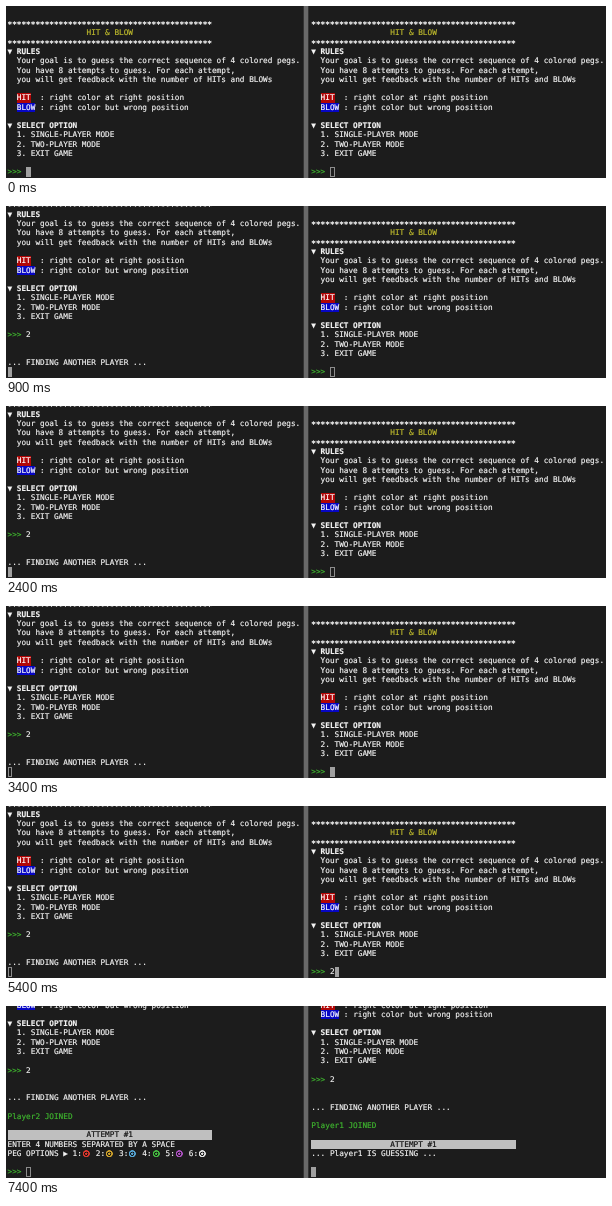
Animation, 600 px wide and 172 px high, one loop 7900 ms. Source, as an HTML page:

```html
<!DOCTYPE html>
<html lang="en">
<head>
<meta charset="utf-8">
<title>Hit &amp; Blow</title>
<style>
  :root { --cell: 4.65px; --row: 9.27px; }
  html, body { margin: 0; width: 100%; height: 100%; overflow: hidden; background: #1c1c1c; }
  #stage {
    position: relative; width: 600px; height: 172px; overflow: hidden;
    background: #1c1c1c; color: #f4f4f4;
    font: 7.724px/var(--row) "DejaVu Sans Mono", monospace;
    text-rendering: geometricPrecision;
    font-variant-ligatures: none;
    -webkit-text-stroke: .18px;
  }
  .pane { position: absolute; top: 0; height: 172px; overflow: hidden; }
  #left { left: 0; width: 297px; }
  #right { left: 302px; width: 298px; }
  .log { position: absolute; bottom: 1.3px; white-space: pre; }
  #left .log { left: 1.5px; }
  #right .log { left: 3.3px; }
  .line { height: var(--row); }
  .line span, .line i { display: inline-block; height: var(--row); vertical-align: top; }
  .line .stars { position: relative; top: 1.2px; font-weight: bold; }
  .title { color: #bdb92c; }
  .head { font-weight: bold; }
  .hit { background: #b00606; color: #fff; }
  .blow { background: #0606c4; color: #fff; }
  .ok { color: #3fb62f; }
  .banner { width: calc(44 * var(--cell)); background: #bfbfbf; color: #111; }
  .peg {
    width: calc(2 * var(--cell));
    background: radial-gradient(circle at 4.3px 4.7px,
      var(--c) 0 1px, #0007 1.4px 1.9px, var(--c) 2.3px 3.2px, transparent 3.8px);
  }
  .cursor { width: var(--cell); box-sizing: border-box; border: 1px solid #8c8c8c; }
  .active .cursor { background: #a0a0a0; border-color: #a0a0a0; }
  #divider {
    position: absolute; left: 297px; top: 0; width: 6px; height: 172px;
    background: linear-gradient(90deg, #333 0 1px, #696969 1px 5px, #333 5px);
  }
</style>
</head>
<body>
<div id="stage">
  <div class="pane" id="left"><div class="log"></div></div>
  <div class="pane" id="right"><div class="log"></div></div>
  <div id="divider"></div>
</div>
<script>
const LOOP = 7900;
const span = (cls, text) => `<span class="${cls}">${text}</span>`;
const prompt = typed => span("ok", "&gt;&gt;&gt;") + " " + typed;
const center = " ".repeat(17);
const stars = span("stars", "*".repeat(44));
const pegColors = ["#e2392f", "#d3a52c", "#58a8d8", "#46bd42", "#b053c4", "#e4e4e4"];
const pegs = pegColors.map((c, i) => `${i + 1}:<i class="peg" style="--c:${c}"></i>`).join(" ");

const menu = [
  stars,
  center + span("title", "HIT &amp; BLOW"),
  stars,
  span("head", "▼ RULES"),
  "  Your goal is to guess the correct sequence of 4 colored pegs.",
  "  You have 8 attempts to guess. For each attempt,",
  "  you will get feedback with the number of HITs and BLOWs",
  "",
  "  " + span("hit", "HIT") + "  : right color at right position",
  "  " + span("blow", "BLOW") + " : right color but wrong position",
  "",
  span("head", "▼ SELECT OPTION"),
  "  1. SINGLE-PLAYER MODE",
  "  2. TWO-PLAYER MODE",
  "  3. EXIT GAME",
  ""
];
const asking = [...menu, prompt("")];
const typed = [...menu, prompt("2")];
const finding = [...typed, "", "", "... FINDING ANOTHER PLAYER ..."];
const joined = name => [
  ...finding, "", span("ok", name + " JOINED"), "",
  span("banner", center + "ATTEMPT #1")
];
const guessing = [
  ...joined("Player2"),
  "ENTER 4 NUMBERS SEPARATED BY A SPACE",
  "PEG OPTIONS ▶ " + pegs,
  "", prompt("")
];
const waiting = [...joined("Player1"), "... Player1 IS GUESSING ...", "", ""];

// start time, left log, right log, focused pane
const steps = [
  [0, asking, asking, "left"],
  [300, typed, asking, "left"],
  [900, [...finding, ""], asking, "left"],
  [3100, [...finding, ""], asking, "right"],
  [5300, [...finding, ""], typed, "right"],
  [5900, guessing, waiting, "right"]
];

function show(id, lines, focus) {
  const pane = document.getElementById(id);
  pane.classList.toggle("active", id === focus);
  const last = lines.length - 1;
  pane.firstElementChild.innerHTML = lines
    .map((text, i) => `<div class="line">${text}${i === last ? '<i class="cursor"></i>' : ""}</div>`)
    .join("");
}

let current;
function tick() {
  const t = performance.now() % LOOP;
  const step = steps.findLast(([start]) => start <= t);
  if (step !== current) {
    current = step;
    const [, left, right, focus] = step;
    show("left", left, focus);
    show("right", right, focus);
  }
  requestAnimationFrame(tick);
}
tick();
</script>
</body>
</html>
```
